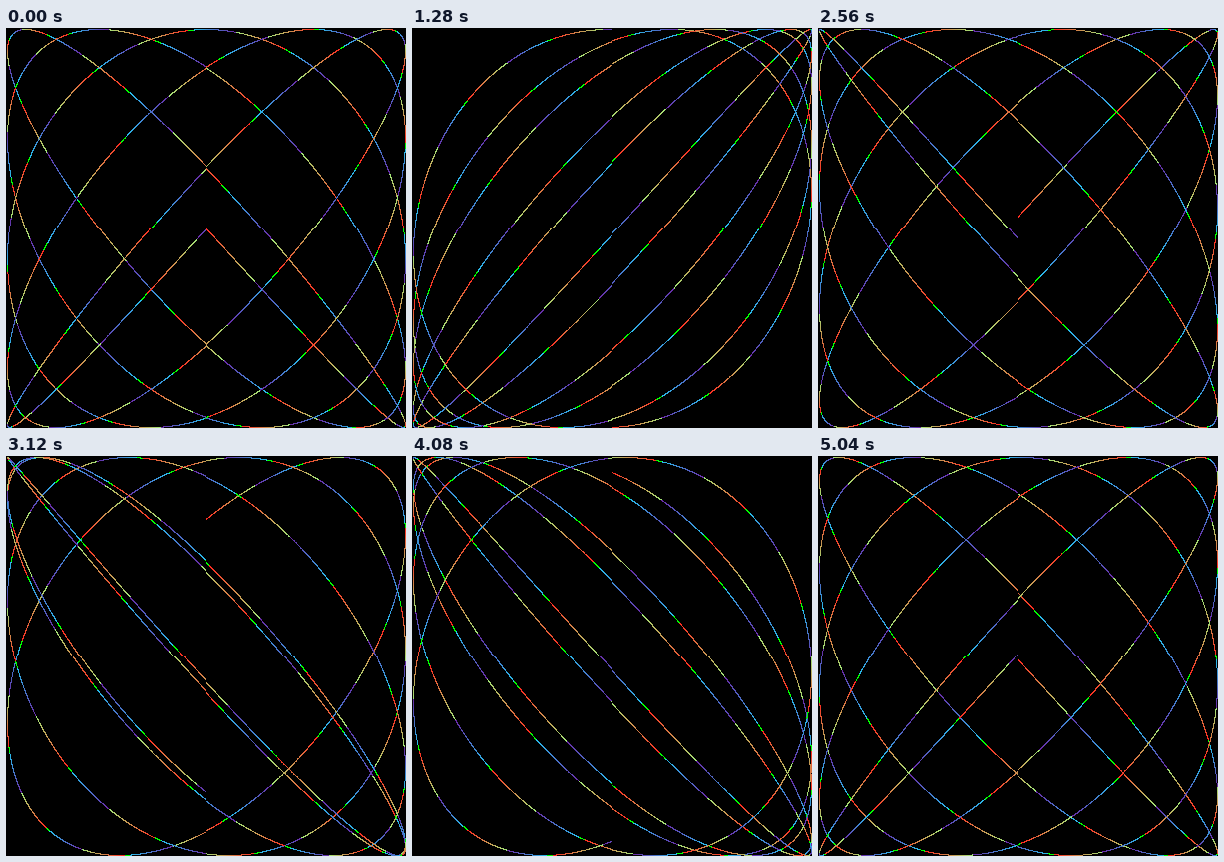
An HTML page with a canvas that plays this animation: 400x400 px, repeating every 5120 ms.

```html
<!DOCTYPE html>
<html lang="en">
<head>
<meta charset="utf-8">
<title>Lissajous</title>
<style>
  html, body { margin: 0; width: 100%; height: 100%; overflow: hidden; background: #000; }
  canvas { display: block; width: 400px; height: 400px; image-rendering: pixelated; }
</style>
</head>
<body>
<canvas id="stage" width="400" height="400"></canvas>
<script>
const SIZE = 400, R = SIZE / 2;
const CYCLES = 5, FREQ = 1.1, RES = 0.001;
const STEPS = 64, STEP_MS = 80, PHASE_STEP = 0.1;

// Along the curve: a warm ramp, a cool ramp, then a short green dash.
const PERIOD = 0.51, WARM_END = PERIOD / 2, COOL_END = 0.48;
const RED = [255, 40, 30], PALE = [160, 230, 120];
const PURPLE = [105, 40, 165], CYAN = [40, 190, 235], GREEN = [0, 255, 0];

const ctx = document.getElementById('stage').getContext('2d');
const image = ctx.createImageData(SIZE, SIZE);
const pixels = new Uint32Array(image.data.buffer);
const pack = ([r, g, b]) => (255 << 24 | b << 16 | g << 8 | r) >>> 0;
const mix = (a, b, k) => a.map((v, i) => Math.round(v + (b[i] - v) * k));

function colorAt(t) {
  const u = t % PERIOD;
  if (u < WARM_END) return mix(RED, PALE, u / WARM_END);
  if (u < COOL_END) return mix(PURPLE, CYAN, (u - WARM_END) / (COOL_END - WARM_END));
  return GREEN;
}

// The colours depend on t alone, so they are worked out once.
const COUNT = Math.ceil(CYCLES * 2 * Math.PI / RES);
const colors = Uint32Array.from({ length: COUNT }, (_, i) => pack(colorAt(i * RES)));

// A grid of SIZE + 1 cells squeezed into SIZE: the middle cell drops out (-1).
function toPixel(v) {
  const offset = Math.trunc(v * R + 0.5);
  if (offset === 0) return -1;
  return R + offset - (offset > 0 ? 1 : 0);
}

function draw(step) {
  const phase = step * PHASE_STEP;
  pixels.fill(pack([0, 0, 0]));
  for (let i = 0; i < COUNT; i++) {
    const t = i * RES;
    const x = toPixel(Math.sin(t));
    const y = toPixel(Math.sin(t * FREQ + phase));
    if (x >= 0 && y >= 0) pixels[y * SIZE + x] = colors[i];
  }
  ctx.putImageData(image, 0, 0);
}

let start = null, shown = 0;

function tick(now) {
  if (start === null) start = now;
  const step = Math.floor(Math.max(0, now - start) / STEP_MS) % STEPS;
  if (step !== shown) draw(shown = step);
  requestAnimationFrame(tick);
}

draw(0);
requestAnimationFrame(tick);
</script>
</body>
</html>
```
